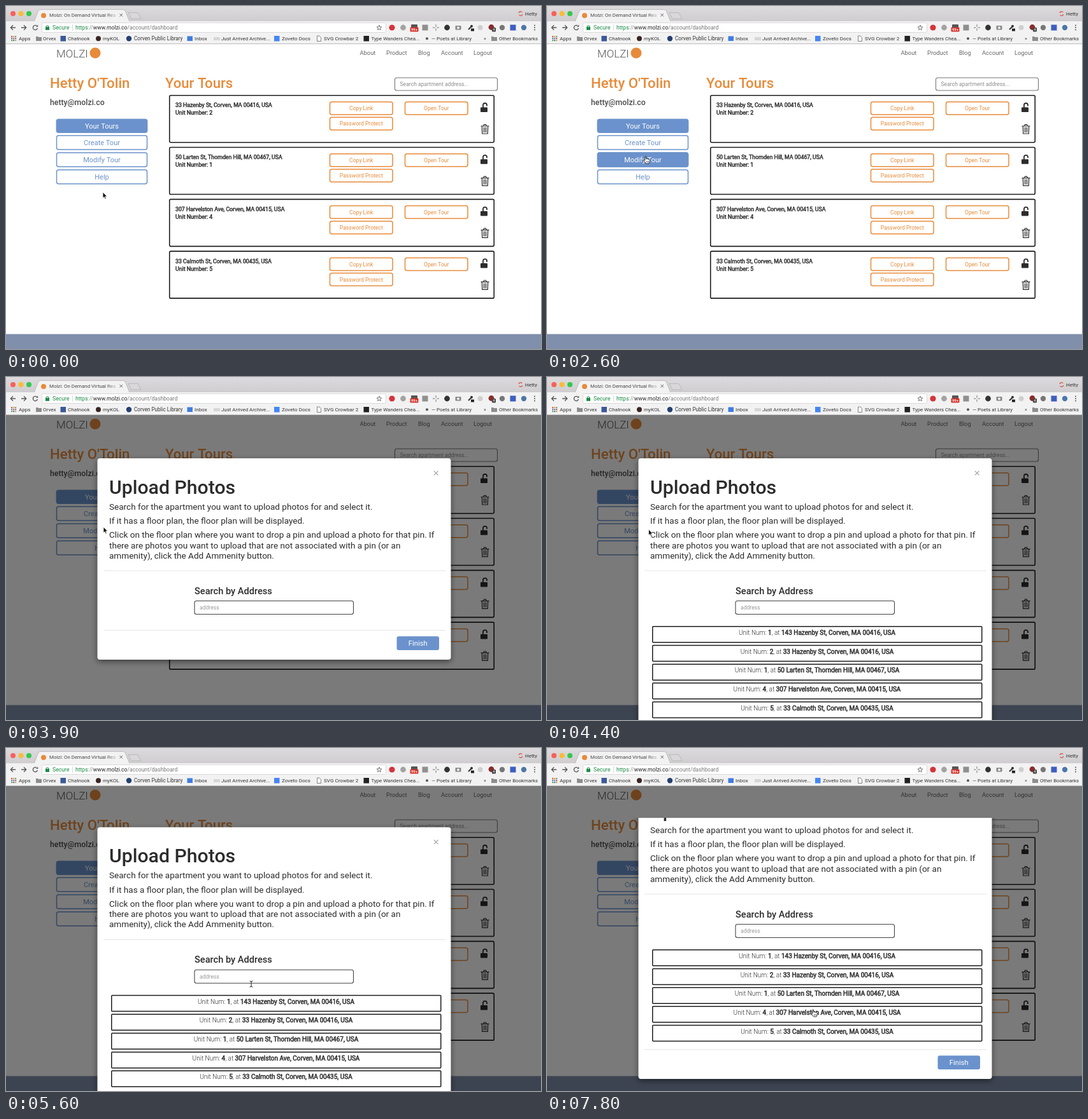
An HTML page with a canvas for the animation above (7.9 s loop, 840 px wide and 540 px high).

```html
<!DOCTYPE html>
<html lang="en">
<head>
<meta charset="utf-8">
<title>Dashboard tour</title>
<style>
html, body { margin: 0; width: 100%; height: 100%; overflow: hidden; background: #fff; }
canvas { display: block; width: 840px; height: 540px; }
</style>
</head>
<body>
<canvas id="stage" width="840" height="540"></canvas>
<script>
const c = document.getElementById('stage').getContext('2d');
const LOOP = 7900, TAU = Math.PI * 2;
const BLUE = '#6b92cc', ORANGE = '#e78b3a', INK = '#2c2c2c';

const TOURS = [
  ['33 Hazenby St, Corven, MA 00416, USA', 2],
  ['50 Larten St, Thornden Hill, MA 00467, USA', 1],
  ['307 Harvelston Ave, Corven, MA 00415, USA', 4],
  ['33 Calmoth St, Corven, MA 00435, USA', 5]
];
const RESULTS = [['143 Hazenby St, Corven, MA 00416, USA', 1], ...TOURS];

const clamp = v => Math.max(0, Math.min(1, v));
const ease = v => { v = clamp(v); return v * v * (3 - 2 * v); };

function font(size, weight = 400) {
  c.font = `${weight} ${size}px Roboto, Inter, sans-serif`;
}
function text(s, x, y, size, color, { weight = 400, align = 'left', heavy = 0 } = {}) {
  font(size, weight);
  c.textAlign = align;
  c.fillStyle = color;
  c.fillText(s, x, y);
  if (heavy) {
    c.strokeStyle = color;
    c.lineWidth = heavy;
    c.strokeText(s, x, y);
  }
}
function rect(x, y, w, h, color) {
  c.fillStyle = color;
  c.fillRect(x, y, w, h);
}
function box(x, y, w, h, r, fill, stroke, width = 1) {
  c.beginPath();
  c.roundRect(x, y, w, h, r);
  if (fill) { c.fillStyle = fill; c.fill(); }
  if (stroke) { c.strokeStyle = stroke; c.lineWidth = width; c.stroke(); }
}
function dot(x, y, r, color) {
  c.beginPath();
  c.arc(x, y, r, 0, TAU);
  c.fillStyle = color;
  c.fill();
}
// Each argument after the width is a flat list of x, y points.
function lines(color, width, ...paths) {
  c.strokeStyle = color;
  c.lineWidth = width;
  c.beginPath();
  for (const p of paths)
    for (let i = 0; i < p.length; i += 2) c[i ? 'lineTo' : 'moveTo'](p[i], p[i + 1]);
  c.stroke();
}
function shape(points, fill, stroke, width = 1) {
  c.beginPath();
  for (let i = 0; i < points.length; i += 2) c.lineTo(points[i], points[i + 1]);
  c.closePath();
  if (fill) { c.fillStyle = fill; c.fill(); }
  if (stroke) { c.strokeStyle = stroke; c.lineWidth = width; c.stroke(); }
}
function arc(x, y, r, from, to, color, width) {
  c.beginPath();
  c.arc(x, y, r, from, to);
  c.strokeStyle = color;
  c.lineWidth = width;
  c.stroke();
}

// ---- browser window ----

function folder(x, y) {
  shape([x, y - 3, x + 3, y - 3, x + 4, y - 2, x + 9, y - 2, x + 9, y + 4, x, y + 4], '#8d8d8d');
}

function tabStrip() {
  const g = c.createLinearGradient(0, 0, 0, 24);
  g.addColorStop(0, '#dcdadc');
  g.addColorStop(1, '#cfcdcf');
  rect(0, 0, 840, 24, g);
  dot(11, 12, 4, '#f9605a');
  dot(23.5, 12, 4, '#f8bc36');
  dot(36, 12, 4, '#35c84b');
  shape([44, 24.5, 51, 7, 54, 5.5, 184, 5.5, 187, 7, 194, 24.5], '#f3f2f3', '#b5b4b5', 0.8);
  shape([192, 10.5, 207, 10.5, 212, 20, 197, 20], '#d9d8d9', '#b3b2b3', 0.8);
  dot(59, 15, 4, ORANGE);
  const fade = c.createLinearGradient(158, 0, 177, 0);
  fade.addColorStop(0, '#444');
  fade.addColorStop(1, 'rgba(68,68,68,0)');
  text('Molzi: On Demand Virtual Rea', 68, 17.3, 7.9, fade);
  lines('#666', 1, [178.5, 12, 183, 16.5], [183, 12, 178.5, 16.5]);
  arc(808, 12, 3.2, 0.4, 2.4, '#d8493c', 1.2);
  arc(808, 12, 3.2, 3.5, 5.5, '#d8493c', 1.2);
  text('Hetty', 815, 15.2, 8, '#333');
}

function toolbar() {
  rect(0, 24, 840, 36, '#f3f2f3');
  lines('#555', 1.3, [15, 34, 7.5, 34], [11, 30.3, 7.3, 34, 11, 37.7]);
  lines('#555', 1.3, [24, 34, 31.5, 34], [28, 30.3, 31.7, 34, 28, 37.7]);
  arc(46, 34, 3.6, 0.3, 5.3, '#555', 1.3);
  shape([47, 32.8, 50.2, 32.8, 50.2, 29.6], '#555');
  box(56.5, 26.5, 540, 15, 2, '#fff', '#d4d3d4', 0.8);

  const green = '#1a8a45';
  rect(62, 33, 6, 4.8, green);
  arc(65, 33, 2, Math.PI, TAU, green, 1.1);
  text('Secure', 73, 37.2, 8.7, green);
  lines('#ccc', 0.8, [104.5, 29, 104.5, 39]);
  let x = 109;
  for (const [s, color] of [['https', green], ['://', '#888'], ['www.molzi.co', '#222'], ['/account/dashboard', '#777']]) {
    text(s, x, 37.2, 8.6, color);
    x += c.measureText(s).width;
  }
  const star = [];
  for (let i = 0; i < 10; i++) {
    const a = i * Math.PI / 5 - Math.PI / 2, r = i % 2 ? 1.8 : 4.2;
    star.push(586 + r * Math.cos(a), 34.3 + r * Math.sin(a));
  }
  shape(star, null, '#666', 0.9);
  extensions();
}

function extensions() {
  dot(606, 34, 4.6, '#d5333a');
  dot(623.5, 34, 4.4, '#a3a3a3');
  box(636, 29, 10, 7, 1, '#555');
  box(634.5, 33.5, 13, 7, 1, '#d5352c');
  text('99+', 641, 39.4, 6, '#fff', { weight: 500, align: 'center' });
  rect(653.5, 29.5, 9, 9, '#8f8f8f');
  lines('#777', 1, [670, 34, 680, 34], [675, 29, 675, 39]);
  dot(675, 34, 1.6, '#f3f2f3');
  dot(692.5, 34, 4.4, '#333');
  box(705.5, 31, 9, 6.5, 1, '#888');
  dot(710, 34.3, 2, '#f3f2f3');
  lines('#333', 2, [726, 37, 731, 32]);
  dot(731, 31.8, 2, '#333');
  rect(730, 35.5, 5, 4, '#222');
  dot(744.5, 34, 4, '#cfcfcf');
  dot(762, 33.5, 4.4, '#8b2b2a');
  box(763, 34, 6, 6.5, 1, '#444');
  text('4', 766, 39.4, 6, '#fff', { align: 'center' });
  dot(779, 34, 4.2, '#777');
  rect(791.5, 29.5, 9, 9, '#3d5fc0');
  dot(813, 34, 4.2, '#4a78a8');
  for (const y of [30.5, 34, 37.5]) dot(830, y, 1, '#555');
}

function bookmarks() {
  const label = (s, x, size = 8.1) => text(s, x, 54.2, size, '#333');
  const tints = ['#d55', '#e9a23b', '#5a9', '#58c', '#888', '#c66', '#6a6', '#48b', '#da4'];
  tints.forEach((t, i) => rect(8 + i % 3 * 3, 47 + Math.floor(i / 3) * 3, 2.2, 2.2, t));
  label('Apps', 20);
  folder(47, 51);
  label('Orvex', 58);
  rect(85.5, 47, 8.5, 8.5, '#3b5998');
  label('Chatnook', 97);
  dot(145, 51.3, 4, '#3a2522');
  label('myKOL', 152);
  dot(193, 51.3, 4.2, '#25406f');
  label('Corven Public Library', 201, 8.15);
  rect(284.5, 47.5, 8.5, 7.5, '#3f7de0');
  label('Inbox', 296);
  rect(326, 49, 10, 5, '#d6d6d6');
  label('Just Arrived Archive...', 338, 7.9);
  rect(421, 47, 8.5, 8.5, '#4486f4');
  label('Zoveto Docs', 433);
  shape([488.5, 47, 492, 47, 494.5, 49.5, 494.5, 55.5, 488.5, 55.5], '#fff', '#777', 0.9);
  label('SVG Crowbar 2', 499);
  rect(561.5, 47, 8.5, 8.5, '#222');
  label('Type Wanders Chea...', 573.5, 7.9);
  dot(661, 51.3, 2, '#555');
  label('— Poets at Library', 668, 7.9);
  label('»', 750);
  folder(762, 51);
  label('Other Bookmarks', 774, 7.9);
  rect(0, 59, 840, 1, '#bdbcbd');
}

// ---- page ----

function pill(s, x, y, w, h, size, color, filled, alpha = 1) {
  box(x, y, w, h, 3, '#fff', color, 1.5);
  if (filled) {
    c.globalAlpha = alpha;
    box(x, y, w, h, 3, color, color, 1.5);
    c.globalAlpha = 1;
  }
  text(s, x + w / 2, y + h / 2 + size * 0.37, size, filled ? '#fff' : color, { align: 'center' });
}

function lockIcon(x, y) {
  box(x, y + 7.5, 11, 7.5, 1, INK);
  c.beginPath();
  c.moveTo(x + 4, y + 8);
  c.lineTo(x + 4, y + 4);
  c.arc(x + 7, y + 4, 3, Math.PI, TAU);
  c.lineTo(x + 10, y + 5.5);
  c.strokeStyle = INK;
  c.lineWidth = 1.8;
  c.stroke();
}

function trashIcon(x, y) {
  lines(INK, 1.2, [x, y + 3, x + 13, y + 3], [x + 4, y + 3, x + 5, y + 0.6, x + 8, y + 0.6, x + 9, y + 3],
    [x + 1.8, y + 3, x + 2.2, y + 15, x + 10.8, y + 15, x + 11.2, y + 3]);
  lines(INK, 1, [x + 4.5, y + 5, x + 4.5, y + 13], [x + 6.5, y + 5, x + 6.5, y + 13], [x + 8.5, y + 5, x + 8.5, y + 13]);
}

function card([address, unit], y) {
  box(256.75, y + 0.75, 509.5, 74, 2, '#fff', '#1c1c1c', 1.6);
  text(address, 266, y + 19.2, 8.75, INK, { heavy: 0.45 });
  text('Unit Number: ' + unit, 266, y + 31.2, 8.75, INK, { heavy: 0.45 });
  pill('Copy Link', 508.5, y + 11, 98.5, 20, 8.6, ORANGE);
  pill('Password Protect', 508.5, y + 35.2, 98.5, 20, 8.6, ORANGE);
  pill('Open Tour', 626.5, y + 11, 98.5, 20, 8.6, ORANGE);
  lockIcon(745, y + 12);
  trashIcon(745.5, y + 46);
}

function page(t) {
  rect(0, 60, 840, 480, '#fff');
  text('MOLZI', 79, 80.5, 17, '#555', { weight: 300 });
  dot(140, 74, 8.5, ORANGE);
  for (const [s, x] of [['About', 555.5], ['Product', 597], ['Blog', 647], ['Account', 683], ['Logout', 734]])
    text(s, x, 77, 9.35, '#666');

  text("Hetty O'Tolin", 69, 129, 22.2, ORANGE, { weight: 500 });
  text('hetty@molzi.co', 69, 155.8, 12.3, '#4a4a4a', { weight: 500 });
  text('Your Tours', 250, 129, 22.1, ORANGE, { weight: 500 });
  box(610.5, 113, 161, 20, 3, '#fff', '#777', 1.1);
  text('Search apartment address...', 618.5, 126.2, 8.6, '#8c8c8c');

  const helpOn = t >= 1000 && t < 1900, modifyOn = t >= 1900 && t < 3900;
  pill('Your Tours', 79.5, 178.5, 142, 20.5, 11, BLUE, true);
  pill('Create Tour', 79.5, 203.9, 142, 22, 11, BLUE);
  pill('Modify Tour', 79.5, 231, 142, 22, 11, BLUE, modifyOn);
  pill('Help', 79.5, 258.1, 142, 22, 11, BLUE, helpOn, t < 1700 ? 1 : 0.88);
  TOURS.forEach((tour, i) => card(tour, 140 + i * 81.8));
  rect(0, 516.5, 840, 23.5, '#808fab');
}

// ---- dialog ----

function resultRow([address, unit], y) {
  box(165.75, y + 0.75, 517, 25, 1, '#fff', '#1c1c1c', 1.5);
  const parts = [['Unit Num: ', 0], [String(unit), 1], [', at ', 0], [address, 1]];
  const width = ([s, bold]) => { font(10, bold ? 400 : 300); return c.measureText(s).width; };
  let x = 424 - parts.reduce((sum, p) => sum + width(p), 0) / 2;
  for (const p of parts) {
    const w = width(p);
    text(p[0], x, y + 13.8, 10, INK, p[1] ? { heavy: 0.5 } : { weight: 300 });
    x += w;
  }
}

function dialog(t) {
  const extra = t >= 4200 ? 151 : 0;
  const scroll = 75 * ease((t - 5500) / 800);
  const fading = t < 3900;
  const panelAlpha = fading ? 0.1 : 1, inkAlpha = fading ? 0.22 : 1;
  c.save();
  c.beginPath();
  c.rect(0, 110, 840, 430);
  c.clip();
  c.translate(0, -scroll);

  c.globalAlpha = panelAlpha;
  c.save();
  c.shadowColor = 'rgba(0,0,0,.5)';
  c.shadowBlur = 10;
  c.shadowOffsetY = 3;
  box(143.5, 128, 555, 317 + extra, 4, '#fff');
  c.restore();
  rect(153, 304.5, 537, 1, '#e3e3e3');
  rect(153, 398.3 + extra, 537, 1, '#e3e3e3');
  box(296, 352.5, 249.5, 21, 3, '#fff', '#444', 1.1);
  box(613.5, 408.3 + extra, 66.5, 21.7, 3, BLUE);
  text('Finish', 646.7, 423.2 + extra, 11.2, '#fff', { align: 'center' });

  c.globalAlpha = inkAlpha;
  lines('#aaa', 1.3, [672, 148, 678.5, 154.5], [678.5, 148, 672, 154.5]);
  text('Upload Photos', 162, 183.6, 30.2, INK, { weight: 500 });
  const copy = [
    ['Search for the apartment you want to upload photos for and select it.', 208.6],
    ['If it has a floor plan, the floor plan will be displayed.', 231],
    ['Click on the floor plan where you want to drop a pin and upload a photo for that pin. If', 253.2],
    ['there are photos you want to upload that are not associated with a pin (or an', 269.5],
    ['ammenity), click the Add Ammenity button.', 285.7]
  ];
  for (const [s, y] of copy) text(s, 162, y, 13.56, INK);
  text('Search by Address', 296, 341.6, 14.6, INK, { weight: 500 });
  text('address', 304, 366.2, 8.6, '#999');
  if (extra) RESULTS.forEach((r, i) => resultRow(r, 392 + i * 29.7));
  c.restore();
}

// ---- pointer ----

const PATH = [
  [0, 152, 293], [1200, 153, 264], [1600, 153, 264], [1700, 153, 237], [3000, 153, 237],
  [3100, 153, 236], [4300, 153, 236], [5300, 384.6, 373], [5500, 384.6, 373],
  [6400, 397, 331], [6700, 397, 331], [7600, 416, 412], [LOOP, 416, 412]
];

function pointerAt(t) {
  const i = PATH.findIndex(p => p[0] > t);
  const [t0, x0, y0] = PATH[i - 1], [t1, x1, y1] = PATH[i];
  const k = ease((t - t0) / (t1 - t0));
  return [x0 + (x1 - x0) * k, y0 + (y1 - y0) * k];
}

function arrow() {
  shape([0, 0, 0, 9.5, 2.1, 7.6, 3.6, 11, 5.2, 10.3, 3.7, 7, 6.5, 6.8], '#111', '#fff', 0.8);
}
function hand() {
  shape([1, 0, 2.4, 0, 3, 4, 4.6, 3.6, 6, 4.3, 7.4, 4.2, 8.4, 5.4, 8, 8.5, 7, 11, 2.6, 11, 0.2, 8, -1.8, 5.8, -0.8, 5, 0.9, 6.2],
    '#fff', '#222', 0.9);
  lines('#222', 0.6, [3.4, 7, 3.4, 9.4], [4.9, 7, 4.9, 9.4], [6.3, 7, 6.3, 9.4]);
}
function beam() {
  lines('#222', 1, [-2.4, -4.7, 0, -4, 2.4, -4.7], [0, -4, 0, 4], [-2.4, 4.7, 0, 4, 2.4, 4.7]);
}

function pointer(t) {
  const [x, y] = pointerAt(t);
  let draw = arrow;
  if (t < 3100) { if (y < 281) draw = hand; }
  else if (t >= 6000) draw = hand;
  else if (y > 352) draw = beam;
  c.save();
  c.translate(x, y);
  draw();
  c.restore();
}

function frame(now) {
  const t = Math.floor(now % LOOP / 100) * 100;
  page(t);
  if (t >= 3100) {
    rect(0, 60, 840, 480, 'rgba(0,0,0,.52)');
    dialog(t);
  }
  tabStrip();
  toolbar();
  bookmarks();
  pointer(t);
}

const start = performance.now();
function tick() {
  frame(performance.now() - start);
  requestAnimationFrame(tick);
}
tick();
</script>
</body>
</html>
```
